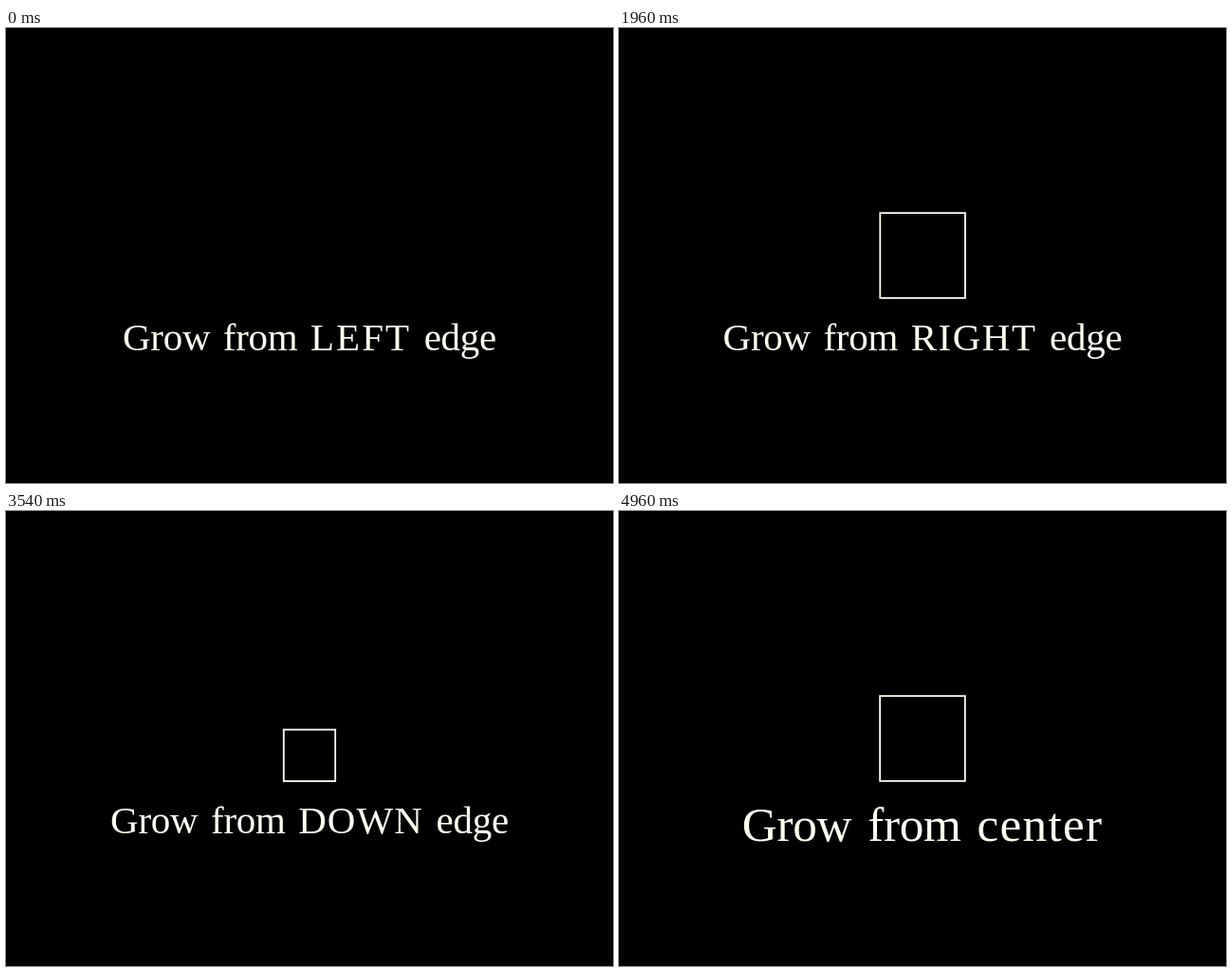
An HTML page that plays this animation: 640x480 px, repeating every 5 s.

```html
<!DOCTYPE html>
<html lang="en">
<head>
<meta charset="utf-8">
<title>Grow from edge</title>
<style>
  html, body { margin: 0; width: 100%; height: 100%; overflow: hidden; background: #000; }
  svg { display: block; }
  text {
    font-family: "Liberation Serif", "Times New Roman", serif;
    fill: #fffff0; text-anchor: middle;
    letter-spacing: -.006em; word-spacing: .085em;
  }
  rect { fill: none; stroke: #fffff0; stroke-width: 1.8; }
</style>
</head>
<body>
<svg width="640" height="480" viewBox="0 0 640 480">
  <rect id="square"/>
  <text id="label" x="320">Grow from <tspan id="word"></tspan><tspan id="tail"></tspan></text>
</svg>
<script>
const FPS = 24, SIDE = 90, LEFT = 275, TOP = 195;
const square = document.getElementById("square");
const label = document.getElementById("label");
const word = document.getElementById("word");
const tail = document.getElementById("tail");

// ax, ay: fixed point of the growth within the square, from 0 to 1
const edge = (name, ax, ay, tracking) =>
  ({ name, ax, ay, tracking, tail: " edge", size: 41, baseline: 340.3 });
const scenes = [
  edge("LEFT", 0, .5, .05),
  edge("RIGHT", 1, .5, .037),
  edge("UP", .5, 0, .054),
  edge("DOWN", .5, 1, .026),
  { name: "center", ax: .5, ay: .5, tracking: .024, tail: "", size: 51.3, baseline: 348 }
];

const sigmoid = x => 1 / (1 + Math.exp(-x));
const low = sigmoid(-5);
const smooth = t => (sigmoid(10 * (t - .5)) - low) / (1 - 2 * low);

function setAttrs(el, attrs) {
  for (const key in attrs) el.setAttribute(key, attrs[key]);
}

let shown;
function showLabel(scene) {
  if (scene === shown) return;
  shown = scene;
  setAttrs(label, { y: scene.baseline, "font-size": scene.size });
  word.style.letterSpacing = scene.tracking + "em";
  word.textContent = scene.name;
  tail.textContent = scene.tail;
}

function draw(ms) {
  // Delays are rounded to 10 ms, so each step may begin up to 5 ms early
  const step = Math.floor((ms + 5) * FPS / 1000) % (FPS * scenes.length);
  const scene = scenes[Math.floor(step / FPS)];
  const size = SIDE * smooth(step % FPS / FPS);
  showLabel(scene);
  setAttrs(square, {
    x: LEFT + scene.ax * (SIDE - size),
    y: TOP + scene.ay * (SIDE - size),
    width: size,
    height: size
  });
}

const start = performance.now();
function tick() {
  draw(performance.now() - start);
  requestAnimationFrame(tick);
}
tick();
</script>
</body>
</html>
```
